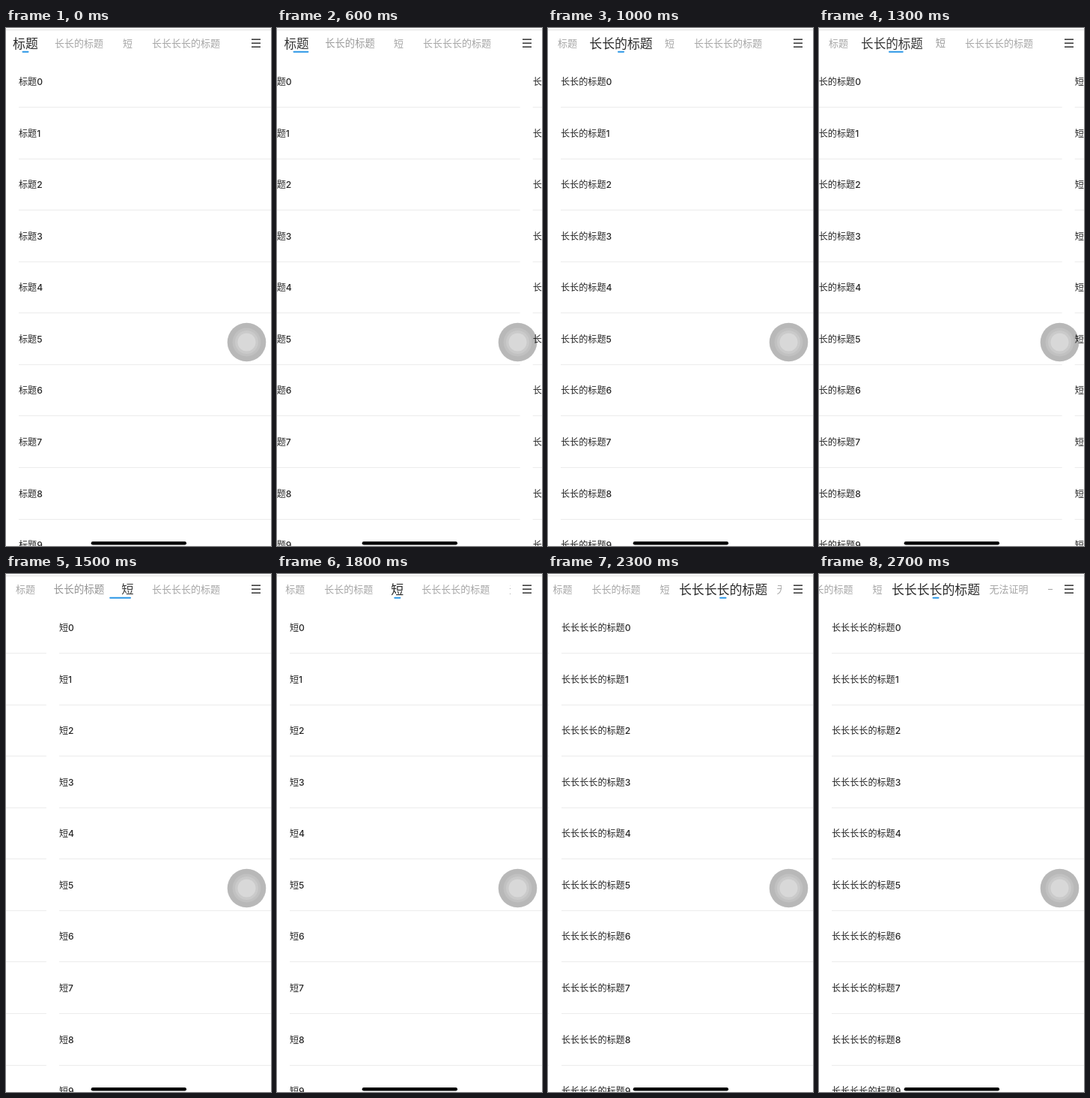
Recreate the animation shown at these times as an HTML page with a canvas. Size 354 px wide and 690 px high, loop 2.8 s.

```html
<!DOCTYPE html>
<html lang="zh-CN">
<head>
<meta charset="utf-8">
<style>
  html, body { margin: 0; width: 354px; height: 690px; overflow: hidden; background: #fff; }
  canvas { display: block; }
</style>
</head>
<body>
<canvas id="stage" width="354" height="690"></canvas>
<script>
const W = 354, H = 690, LOOP = 2800, STEP = 100;
const ctx = document.getElementById('stage').getContext('2d');
const FONT = 'px Inter, "Noto Sans CJK SC", "Noto Sans CJK", sans-serif';
const TAB_SIZE = 13, TAB_GAP = 26, TABS_WIDTH = 312, MARK = 9;

let nextX = TAB_SIZE;
const tabs = ['标题', '长长的标题', '短', '长长长长的标题', '无法证明', '一'].map(label => {
  const width = label.length * TAB_SIZE;
  const tab = { label, center: nextX + width / 2 };
  nextX += width + TAB_GAP;
  return tab;
});

const clamp = v => Math.max(0, Math.min(1, v));
const mix = (a, b, k) => a + (b - a) * k;
const centered = i => tabs[i].center - TABS_WIDTH / 2;

// Drag followed by a decelerating settle; snaps after `steps` ticks.
function swipe(t, start, steps) {
  const k = (t - start) / STEP;
  if (k < 0) return 0;
  return k >= steps ? 1 : 1 / (1 + Math.exp(-2.06 * (k - 1.167)));
}

function glide(t, start) {
  if (t < start) return 0;
  const k = clamp((t - start + STEP) / 300);
  return k * k * (3 - 2 * k);
}

function rect(x, y, w, h, color, radius = 0) {
  ctx.fillStyle = color;
  ctx.beginPath();
  ctx.roundRect(x, y, w, h, radius);
  ctx.fill();
}

function disc(x, y, r, color) {
  rect(x - r, y - r, 2 * r, 2 * r, color, r);
}

function text(str, x, middle, size, color, align, weight = 400) {
  ctx.font = `${weight} ${size}${FONT}`;
  ctx.textAlign = align;
  ctx.fillStyle = color;
  ctx.fillText(str, x, Math.round(middle + size * 0.38));
}

function drawPage(index, x) {
  for (let i = 0; i < 10; i++) {
    const y = i * 68.57;
    text(tabs[index].label + i, x + 17, 71.4 + y, 12.1, '#262626', 'left', 500);
    rect(x + 17, Math.round(105 + y), W - 17, 1, '#ececec');
  }
}

function drawTabs(pos, scroll) {
  ctx.save();
  ctx.beginPath();
  ctx.rect(0, 0, TABS_WIDTH, 40);
  ctx.clip();
  ctx.translate(-scroll, 0);
  tabs.forEach(({ label, center }, i) => {
    const active = clamp(1 - Math.abs(pos - i));
    const gray = Math.round(mix(166, 44, active));
    text(label, center, 20.3, TAB_SIZE * (1 + 0.3 * active), `rgb(${gray},${gray},${gray})`, 'center');
  });
  // The leading edge moves in the first half, the trailing edge in the second.
  const i = Math.floor(pos), k = pos - i;
  const from = tabs[i].center, to = tabs[i + 1].center;
  const left = mix(from, to, clamp(2 * k - 1)) - MARK / 2;
  const right = mix(from, to, clamp(2 * k)) + MARK / 2;
  rect(left, 30.7, right - left, 2, '#2a96e6', 1);
  ctx.restore();
}

function drawOverlay() {
  rect(0, 2, W, 1, '#dedede');
  for (const y of [14.5, 19.5, 24.5]) rect(328, y, 12, 1.4, '#222');
  disc(321.5, 418.5, 25.8, 'rgba(0,0,0,.28)');
  disc(321.5, 418.5, 19, 'rgba(255,255,255,.12)');
  disc(321.5, 418.5, 15.5, 'rgba(255,255,255,.15)');
  disc(321.5, 418.5, 12, 'rgba(255,255,255,.28)');
  rect(113.7, 684, 127.3, 4.5, '#000', 2.25);
}

function draw(now) {
  const t = Math.floor(now % LOOP / STEP) * STEP;
  const pos = swipe(t, 600, 4) + swipe(t, 1300, 5) + swipe(t, 1900, 5);
  const scroll = mix(centered(2) * glide(t, 1800), centered(3), glide(t, 2500));
  const page = Math.floor(pos);
  rect(0, 0, W, H, '#fff');
  drawPage(page, (page - pos) * W);
  if (pos > page) drawPage(page + 1, (page + 1 - pos) * W);
  drawTabs(pos, scroll);
  drawOverlay();
}

let origin;
function tick(now) {
  origin ??= now;
  draw(now - origin);
  requestAnimationFrame(tick);
}
requestAnimationFrame(tick);
</script>
</body>
</html>
```
